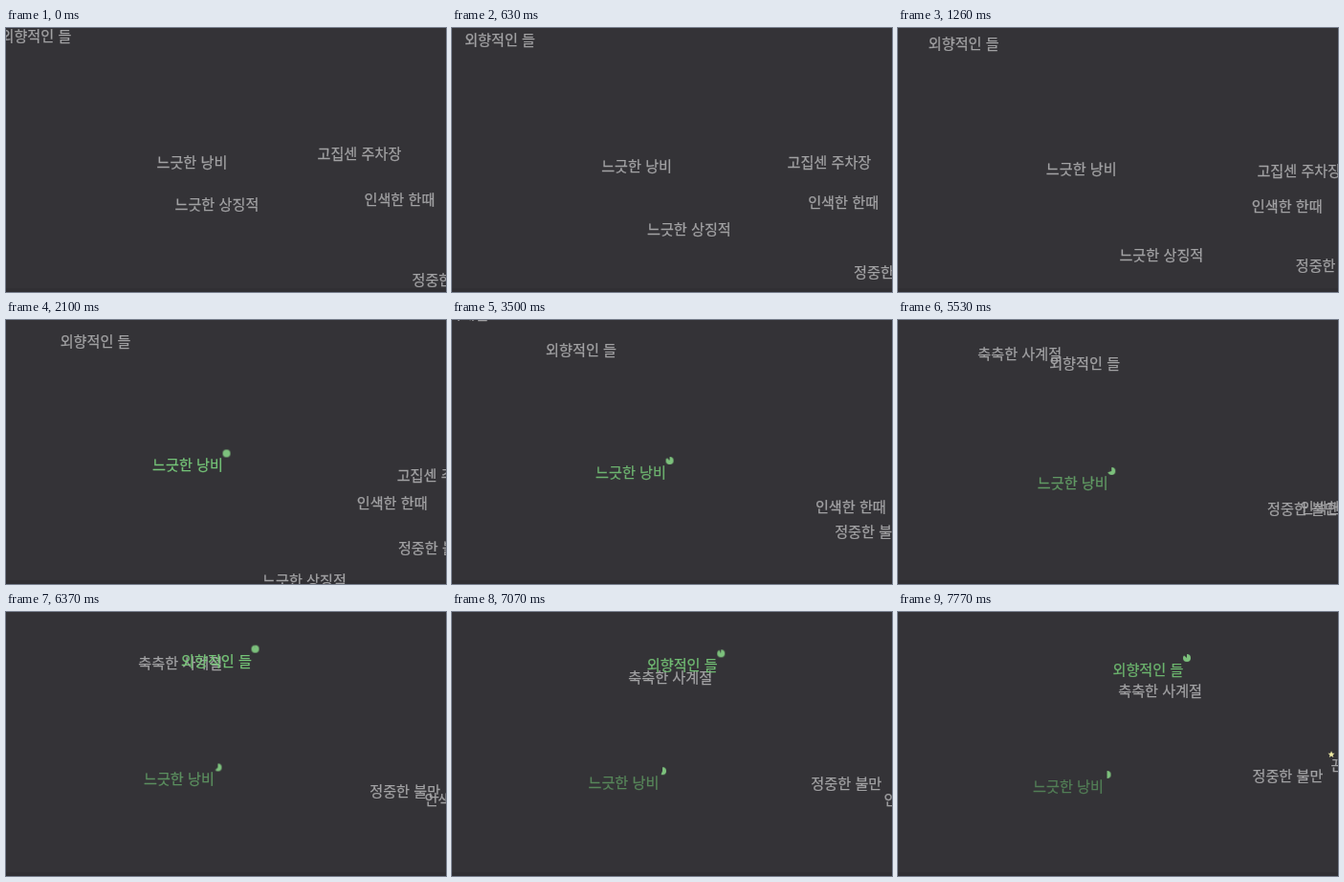
An HTML page for the animation above (7.84 s loop, 460 by 276 pixels).

```html
<!DOCTYPE html>
<html lang="ko">
<head>
<meta charset="utf-8">
<title>Drifting phrases</title>
<style>
  html, body { margin: 0; width: 100%; height: 100%; overflow: hidden; background: #343337; }
  #stage {
    position: relative; width: 460px; height: 276px; overflow: hidden;
    background: linear-gradient(#343337 272px, #302f33 272px);
    font: 400 15.15px/20px "Noto Sans CJK KR", "Noto Sans CJK", sans-serif;
    -webkit-text-stroke: .25px;
    color: #a2a2a4;
  }
  /* --x is the left edge, --y the middle line, --vx and --vy pixels per second */
  .word {
    position: absolute; left: -.5px; top: -11.1px; white-space: nowrap;
    animation: drift 7.84s steps(112) infinite;
  }
  @keyframes drift {
    from { transform: translate(var(--x), var(--y)); }
    to { transform: translate(calc(var(--x) + var(--vx) * 7.84), calc(var(--y) + var(--vy) * 7.84)); }
  }
  .bounce { animation-name: bounce; animation-timing-function: linear; }
  @keyframes bounce {
    0% { transform: translate(375px, 178.5px); animation-timing-function: steps(39); }
    34.821% { transform: translate(364.9px, 194.9px); animation-timing-function: steps(73); }
    100% { transform: translate(467.6px, 196.2px); }
  }

  .mark { position: absolute; left: 73.9px; top: -4.6px; width: 8px; height: 8px; overflow: visible; }
  .mark circle {
    fill: none; stroke: #7cc17c; stroke-width: 4; stroke-dasharray: 100 100;
    transform: rotate(-90deg); transform-origin: 4px 4px;
  }
  .star { left: -3.5px; top: -4.4px; fill: #f1eda6; }

  .early span { animation: earlyTint 7.84s linear infinite; }
  .early circle { animation: earlyPie 7.84s linear infinite; }
  .late span { animation: lateTint 7.84s linear infinite; }
  .late circle { animation: latePie 7.84s linear infinite; }

  @keyframes earlyTint {
    0%, 21.42% { color: #a2a2a4; }
    21.43% { color: #78c97a; }
    100% { color: #527d56; }
  }
  @keyframes earlyPie {
    0%, 21.42% { opacity: 0; }
    21.43% { opacity: 1; }
    26.79% { stroke-dasharray: 100 100; }
    100% { stroke-dasharray: 49.5 100; opacity: 1; }
  }
  @keyframes lateTint {
    0%, 74.99% { color: #a2a2a4; }
    75% { color: #78c97a; }
    100% { color: #6cb46e; }
  }
  @keyframes latePie {
    0%, 74.99% { opacity: 0; }
    75% { opacity: 1; }
    80.36% { stroke-dasharray: 100 100; }
    100% { stroke-dasharray: 86 100; opacity: 1; }
  }
</style>
</head>
<body>
<div id="stage">
  <div class="word" style="--x:177px; --y:184px; --vx:43.6px; --vy:41.9px">느긋한 상징적</div>
  <div class="word" style="--x:326px; --y:130.5px; --vx:39.6px; --vy:14.8px">고집센 주차장</div>
  <div class="word bounce">인색한 한때</div>
  <div class="word" style="--x:425px; --y:262.5px; --vx:-6.95px; --vy:-11.84px">정중한 불만</div>
  <div class="word" style="--x:-279px; --y:-80.6px; --vx:65.6px; --vy:20.95px">축축한 사계절</div>
  <div class="word" style="--x:725px; --y:121.1px; --vx:-35px; --vy:5px">끈질긴 오후
    <svg class="mark star" viewBox="-4 -4 8 8"><path d="M0-3.6L1-1.2L3.5-1.1L1.5.5L2.2 3L0 1.6L-2.2 3L-1.5.5L-3.5-1.1L-1-1.2Z"/></svg>
  </div>
  <div class="word early" style="--x:158px; --y:140.2px; --vx:-2.12px; --vy:5.38px"><span>느긋한 낭비</span>
    <svg class="mark" viewBox="0 0 8 8"><circle cx="4" cy="4" r="2" pathLength="100"/></svg>
  </div>
  <div class="word late" style="--x:-5px; --y:8px; --vx:29.6px; --vy:6.7px"><span>외향적인 들</span>
    <svg class="mark" viewBox="0 0 8 8"><circle cx="4" cy="4" r="2" pathLength="100"/></svg>
  </div>
</div>
</body>
</html>
```
